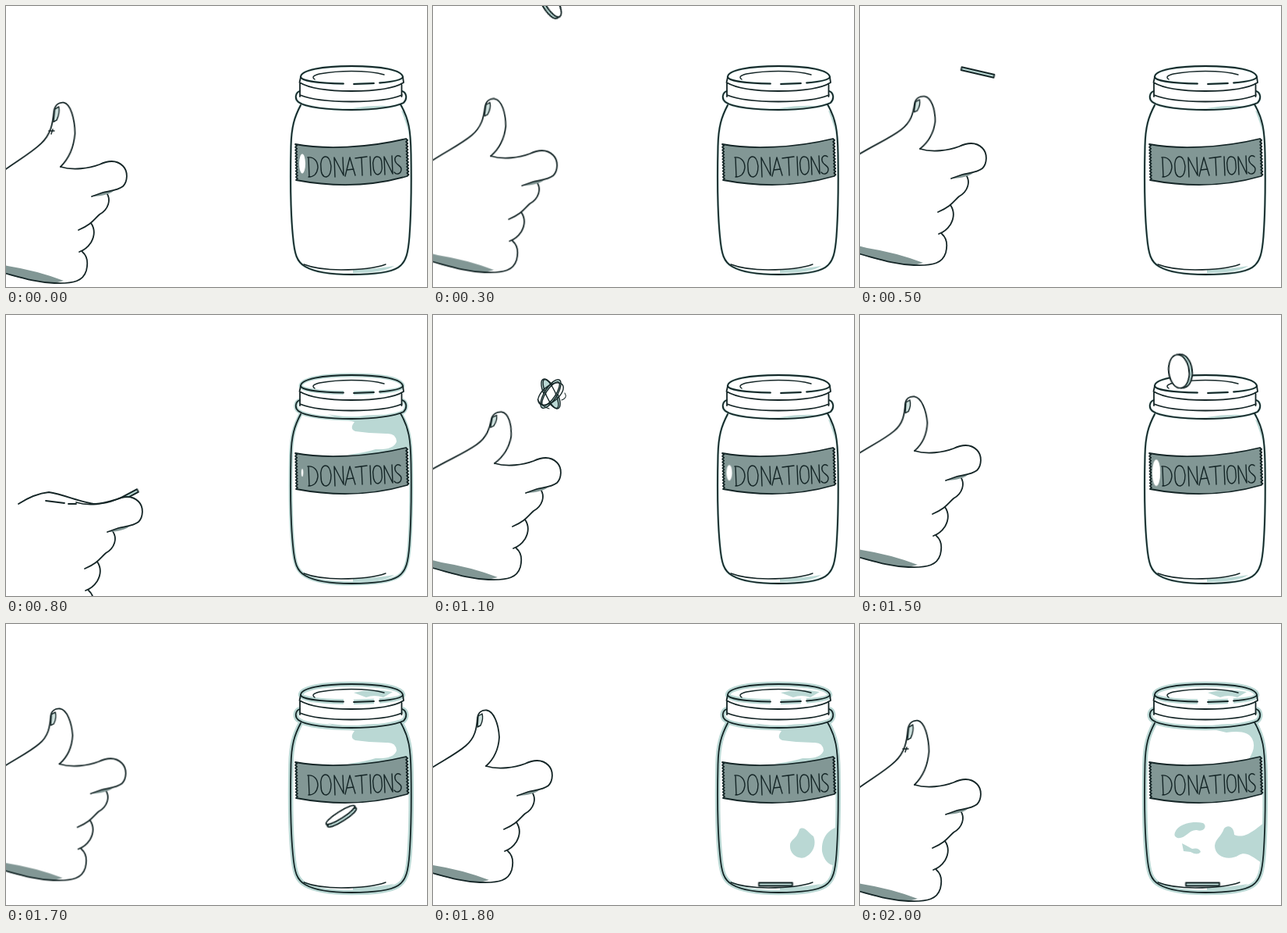
Animation of 540 by 360 pixels, one loop 2100 ms. Source, as an HTML page:

```html
<!DOCTYPE html>
<html lang="en">
<head>
<meta charset="utf-8">
<title>Coin flip into a donation jar</title>
<style>
  html, body { margin: 0; width: 100%; height: 100%; overflow: hidden; background: #fff; }
  svg { display: block; width: 540px; height: 360px; }
  .ink { fill: none; stroke: #142526; stroke-width: 1.8; stroke-linecap: round; stroke-linejoin: round; }
  .ink * { vector-effect: non-scaling-stroke; }
  .fine { stroke-width: 1.4; }
  .tint { fill: #bad8d4; }
  .grey { fill: #829795; stroke: none; }
  .white { fill: #fff; }
  #tape { fill: #829795; }
  #nail { fill: #cfe2df; }
  #glow { fill: none; stroke: #bad8d4; }

  /* One loop is 21 held pictures of 100 ms; steps(n) spans n of them. */
  #hand, #index, #thumb, #fold, #knuckle, #wrinkle, #coin, .face, #spin, #shine, #glow, .glass, .spots, .late, .lit {
    animation: 2100ms step-end infinite;
  }
  #hand { animation-name: hand; }
  #index { animation-name: index; }
  #thumb { animation-name: thumb; transform-origin: 0 182px; }
  #fold { animation-name: fold; }
  #wrinkle { animation-name: wrinkle; }
  #coin { animation-name: coin; }
  .face { animation-name: face; }
  #spin { animation-name: spin; }
  #shine { animation-name: shine; transform-origin: 380px 202px; }
  #glow { animation-name: glow; }
  .glass { animation-name: glass; }
  .spots { animation-name: spots; }
  .late { animation-name: late; }
  .lit { animation-name: lit; }

  @keyframes hand {
    0% { transform: translate(2px, 24px); animation-timing-function: steps(5); }
    23.809% { transform: translate(9px, 1px); animation-timing-function: steps(3); }
    38.095% { transform: translate(10px, 62px); }
    47.619% { transform: translate(11px, 26px); }
    52.38% { transform: translate(11px, 8px); animation-timing-function: steps(4); }
    71.428% { transform: translate(2px, -8px); animation-timing-function: steps(3); }
    85.714% { transform: translate(0, 0); animation-timing-function: steps(2); }
    95.238%, 100% { transform: translate(2px, 24px); }
  }
  @keyframes index {
    0%, 23.809% { transform: translate(0, 0); animation-timing-function: steps(3); }
    38.095% { transform: translate(12px, -4px); }
    47.619%, 100% { transform: translate(0, 0); }
  }
  @keyframes thumb {
    0% { transform: skewX(-2deg) scaleY(1.15); animation-timing-function: steps(5); }
    23.809% { transform: skewX(-4deg) scaleY(.94); }
    33.333% { transform: skewX(-4deg) scaleY(.94); visibility: hidden; }
    47.619% { transform: skewX(-7deg) scaleY(.92); visibility: visible; }
    52.38% { transform: skewX(-7deg) scaleY(.92); animation-timing-function: steps(4); }
    71.428% { transform: skewX(1deg) scaleY(.97); animation-timing-function: steps(3); }
    85.714% { transform: skewX(0deg) scaleY(1); animation-timing-function: steps(2); }
    95.238%, 100% { transform: skewX(-2deg) scaleY(1.15); }
  }
  @keyframes fold {
    0%, 47.619%, 100% { visibility: hidden; }
    33.333% { visibility: visible; }
  }
  @keyframes wrinkle {
    0%, 95.238%, 100% { visibility: visible; }
    4.761% { visibility: hidden; }
  }
  @keyframes coin {
    0% { visibility: hidden; transform: translate(150px, -4px) rotate(60deg); }
    14.285% { visibility: visible; transform: translate(150px, -4px) rotate(60deg); animation-timing-function: steps(2); }
    23.809% { visibility: visible; transform: translate(151px, 85px) rotate(13deg); animation-timing-function: steps(3); }
    38.095% { visibility: visible; transform: translate(150px, 235px) rotate(-28deg); }
    47.619% { visibility: hidden; transform: translate(396px, 6px) rotate(-130deg); }
    66.666% { visibility: visible; transform: translate(396px, 6px) rotate(-130deg); }
    71.428% { visibility: visible; transform: translate(411px, 72px) rotate(-97deg); animation-timing-function: steps(3); }
    85.714%, 100% { visibility: visible; transform: translate(439.5px, 333.5px) rotate(0deg); }
  }
  @keyframes face {
    0%, 14.285% { ry: 8px; animation-timing-function: steps(2); }
    23.809%, 38.095% { ry: 0px; }
    28.571% { ry: 4px; }
    66.666% { ry: 9px; }
    71.428% { ry: 13px; animation-timing-function: steps(3); }
    85.714%, 100% { ry: 0px; }
  }
  @keyframes spin {
    0% { visibility: hidden; transform: translate(154px, 182px) rotate(-70deg); }
    47.619% { visibility: visible; transform: translate(154px, 182px) rotate(-70deg); }
    52.38% { visibility: visible; transform: translate(151px, 101px) rotate(0deg); }
    57.142% { visibility: visible; transform: translate(168px, 14px) rotate(70deg); }
    61.904%, 100% { visibility: hidden; transform: translate(168px, 14px) rotate(70deg); }
  }
  @keyframes shine {
    0% { transform: scale(1); animation-timing-function: steps(3); }
    14.285%, 33.333%, 76.19%, 100% { transform: scale(0); }
    38.095% { transform: scale(.3, .4); }
    52.38% { transform: scale(.9, .8); animation-timing-function: steps(4); }
    71.428% { transform: scale(1.3, 1.35); }
  }
  @keyframes glow {
    0%, 47.619%, 100% { stroke-width: 3px; }
    33.333% { stroke-width: 5px; }
    80.952% { stroke-width: 6.5px; }
  }
  @keyframes glass {
    0%, 47.619%, 90.476%, 100% { visibility: hidden; }
    33.333%, 76.19% { visibility: visible; }
  }
  @keyframes spots {
    0%, 90.476%, 100% { visibility: hidden; }
    85.714% { visibility: visible; }
  }
  @keyframes late {
    0% { visibility: hidden; }
    90.476%, 100% { visibility: visible; }
  }
  @keyframes lit {
    0% { visibility: hidden; }
    80.952%, 100% { visibility: visible; }
  }
</style>
</head>
<body>
<svg viewBox="0 0 540 360" role="img" aria-label="A hand flips a coin into a jar labelled DONATIONS">
  <defs>
    <path id="body" d="M378 127C370 142 366 155 365.500 180C364.500 225 365 265 368 295C370 318 373 328 384 334C398 342 420 344 443 344C470 344 492 342 503 335C514 328 516 314 517.500 295C520 260 520 220 519.500 190C519 160 517 145 506 126"/>
    <path id="collar" d="M377 109C371 111 370 119 375 123C384 130 414 133 443 133C474 133 500 129 510 124C515 119 514 111 508 109"/>
    <path id="rim" d="M433 99.500C402 99 379 96 378 91C378 82 406 77 443 77C482 77 508 82 509 91C508 95 496 97 479 98.500M446 100L472 99"/>
  </defs>

  <g id="jar">
    <g id="glow"><use href="#body"/><use href="#collar"/><use href="#rim"/></g>
    <g class="tint">
      <path d="M444 131Q468 127 492 128L476 132Q458 134 444 131ZM511 136Q519 150 518 168Q513 148 507 134ZM445 338Q475 337 498 333Q485 342 445 342Z"/>
      <path class="lit" d="M446 88Q470 82 496 87L484 94Q472 90 462 94Z"/>
      <path class="glass" d="M412 127Q450 134 507 127C517 142 518 158 516 170L478 178Q456 181 438 179Q458 177 474 172Q498 173 501 162Q500 151 488 152Q468 152 448 149Q440 146 447 137Q430 133 412 127Z"/>
      <path class="spots" d="M470 263C476 258 481 267 488 272C492 282 488 294 477 299C467 302 457 294 458 283C459 275 466 277 470 263ZM519 260C505 264 498 276 499 291C501 302 508 310 516 309Z"/>
      <path class="late" d="M440 132Q470 128 506 127Q520 148 516 170L498 174Q509 158 503 147Q497 135 470 139Z"/>
      <path class="late" d="M404 267C408 256 427 252 440 255C446 259 441 267 432 264C422 263 417 276 407 274C403 272 403 270 404 267ZM413 281Q419 284 426 288Q435 286 437 292Q433 297 424 292L415 291ZM455 284C456 275 463 273 467 262C472 256 480 260 480 270C492 275 501 268 519 254L517 307C507 302 497 290 486 296C474 304 455 299 455 284Z"/>
    </g>
    <g class="ink">
      <use href="#body"/><use href="#collar"/><use href="#rim"/>
      <path d="M378 91L376.500 98C392 107 416 109 443 109C474 109 498 106 510 98L509 91M377 99V116M507.500 101V116M377 114C392 120 416 122.500 443 122.500C474 122.500 496 119 508 114"/>
      <path class="fine" d="M396 94Q390 90 402 87Q422 83.500 443 83.500Q470 83.500 485 88M382 331Q400 338 430 338Q468 338 487 331"/>
    </g>
  </g>

  <g id="coin" class="ink">
    <rect class="tint" x="-21.500" y="-2" width="43" height="4"/>
    <ellipse class="face tint" cy="2" rx="21.500"/>
    <ellipse class="face white" cy="-2" rx="21.500"/>
  </g>
  <g id="spin" class="ink fine">
    <ellipse class="tint" rx="21" ry="8" transform="rotate(62)"/>
    <ellipse class="tint" rx="21" ry="8" transform="rotate(-58)"/>
    <ellipse class="white" rx="18" ry="6" transform="rotate(-56)"/>
    <ellipse rx="20" ry="6" transform="rotate(66)"/>
    <ellipse rx="19" ry="10" transform="rotate(-38)"/>
    <path d="M14 8Q22 5 18 -1M-17 7Q-12 16 -2 19" stroke-width="1"/>
  </g>

  <g class="ink">
    <path id="tape"/>
    <ellipse id="shine" class="white" cx="380" cy="202" rx="4" ry="12.500" stroke="none"/>
    <path class="fine" d="M388 194L389 219M387 194C396 193 400 200 400 207C399 215 395 219 388 219
      M410 193C405 193 403 200 404 207C404 215 407 219 411 219C416 218 417 212 417 205C416 198 414 193 410 193Z
      M422 219L421 194L433 217L432 194M435 218L441 194L448 217M437 210L446 209
      M448 195L463 193M456 194L457 217M467 193L468 217
      M476 193C472 193 470 199 471 205C471 212 474 216 477 216C481 215 483 210 482 203C482 197 480 193 476 193Z
      M486 216L485 193L496 215L495 192M506 193C502 190 498 193 499 198C500 204 507 204 507 209C507 215 501 217 498 213"/>
  </g>

  <g id="hand" class="ink">
    <path class="grey" d="M-12 306L0 309Q38 315 72 328L60 331Q25 329 -12 316Z"/>
    <path d="M126 214C134 224 129 237 118 243C111 249 108 256 91 263M107 254C113 263 111 272 107 279C103 285 98 289 92 291M96 291C103 297 103 307 101 315C97 328 86 332 60 331C35 330 15 323 -12 316"/>
    <g id="index">
      <path class="grey" d="M108 220L122 215L137 212Q130 219 108 220Z"/>
      <path class="white" d="M68 182C84 187 105 184 118 179C131 173 141 174 148 181C155 188 154 201 148 207C142 212 130 213 122 215L108 220"/>
    </g>
    <g id="thumb">
      <path d="M-12 191C10 176 28 168 42 156C54 146 56 134 57 120C58 113 63 110 69 110.500C78 112 84 128 85 145C84 162 77 174 68 182"/>
      <path id="nail" class="fine" d="M57 132L61 130Q65 122 63 115L58 118Z"/>
    </g>
    <path id="fold" d="M6 180C20 171 35 166 45 165C65 168 88 179 105 180C118 179 128 175 136 173M41 176L65 179M70 180H80"/>
    <path id="wrinkle" class="fine" d="M53 136L60 136M56 140L58 134"/>
  </g>
</svg>

<script>
// Tape with two torn, saw-toothed ends
const TEETH = 24;
const torn = (x0, y0, x1, y1) => Array.from({ length: TEETH + 1 }, (_, i) => {
  const k = i / TEETH;
  return `L${x0 + (x1 - x0) * k + (i % 2) * 2} ${y0 + (y1 - y0) * k}`;
}).join('');

document.getElementById('tape').setAttribute('d',
  'M371 177C408 184 464 182 513 170' + torn(513, 170, 514.5, 218) +
  'C470 231 420 232 372 223' + torn(372, 223, 371, 177) + 'Z');
</script>
</body>
</html>
```
